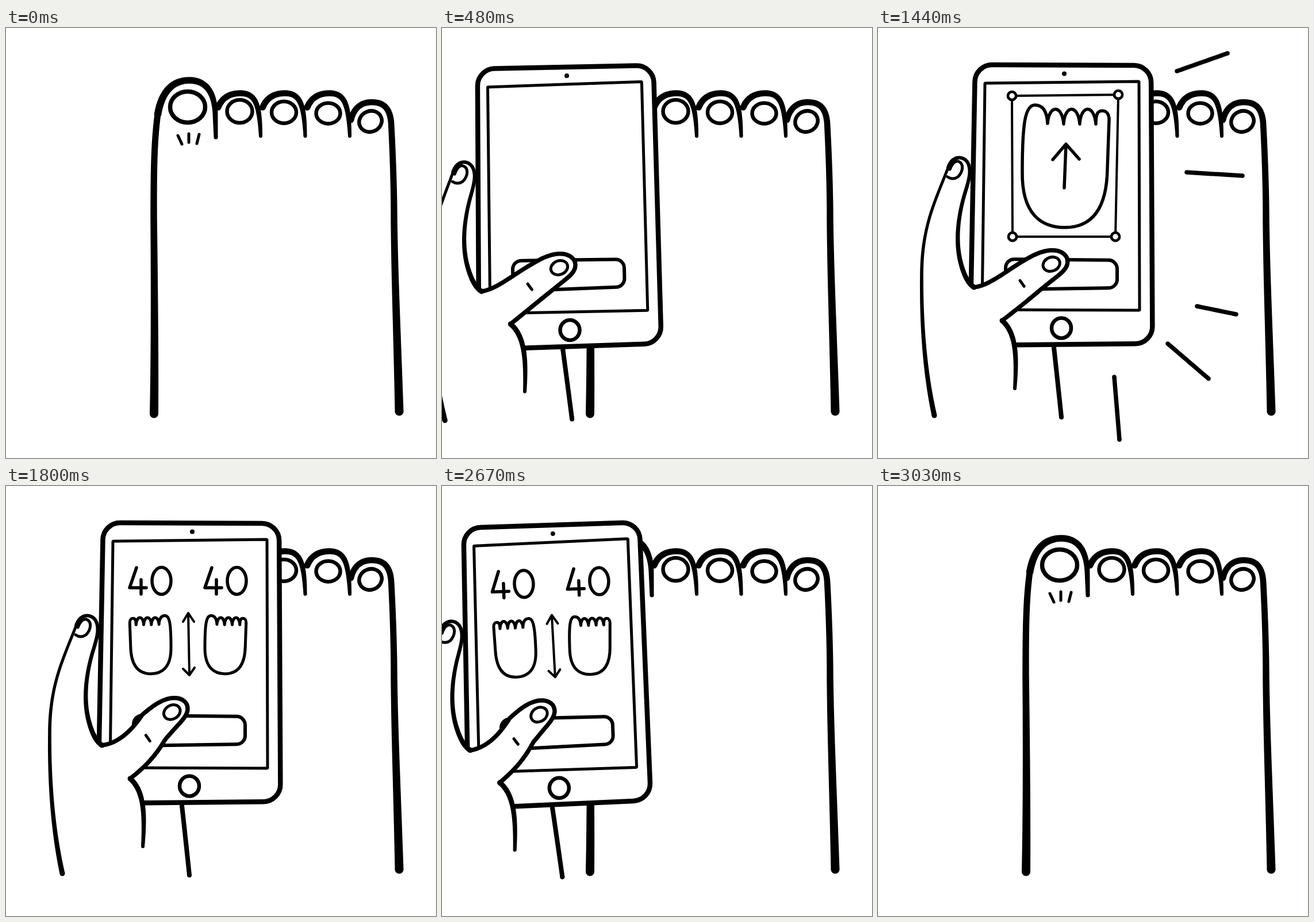
An HTML page with a canvas that plays this animation: 748 px wide and 748 px high, repeating every 3.12 s.

```html
<!DOCTYPE html>
<html lang="en">
<head>
<meta charset="utf-8">
<title>Foot scan</title>
<style>
  html, body { margin: 0; width: 100%; height: 100%; overflow: hidden; background: #fff; }
  canvas { display: block; width: 748px; height: 748px; }
</style>
</head>
<body>
<canvas id="stage" width="748" height="748" role="img" aria-label="A phone scans a foot and shows the sizes 40 and 40"></canvas>
<script>
const ctx = document.getElementById('stage').getContext('2d');
const LOOP = 3120, STEP = 30, SCAN_AT = 780, RESULT_AT = 1530;

// Samples a path as [x, y, width]; the width grows or shrinks towards the end.
function trace(d, from, to = from) {
  const path = document.createElementNS('http://www.w3.org/2000/svg', 'path');
  path.setAttribute('d', d);
  const length = path.getTotalLength(), n = Math.ceil(length / 4);
  return Array.from({ length: n + 1 }, (_, i) => {
    const u = i / n, { x, y } = path.getPointAtLength(length * u);
    return [x, y, from + (to - from) * u * u];
  });
}

function fill(pts, color) {
  ctx.fillStyle = color;
  ctx.beginPath();
  pts.forEach(p => ctx.lineTo(p[0], p[1]));
  ctx.fill();
}

function dot(x, y, w) {
  ctx.fillStyle = '#000';
  ctx.beginPath();
  ctx.arc(x, y, w / 2, 0, 7);
  ctx.fill();
}

// Tapered stroke with round ends.
function ink(pts) {
  const left = [], right = [], last = pts.length - 1;
  pts.forEach(([x, y, w], i) => {
    const a = pts[Math.max(i - 1, 0)], b = pts[Math.min(i + 1, last)];
    const dx = b[0] - a[0], dy = b[1] - a[1], k = w / 2 / (Math.hypot(dx, dy) || 1);
    left.push([x - dy * k, y + dx * k]);
    right.unshift([x + dy * k, y - dx * k]);
  });
  fill(left.concat(right), '#000');
  dot(...pts[0]);
  dot(...pts[last]);
}

function stroke(path, w) {
  ctx.lineWidth = w;
  ctx.stroke(typeof path === 'string' ? new Path2D(path) : path);
}

function ring(x, y, rx, ry, w, turn = 0) {
  ctx.lineWidth = w;
  ctx.beginPath();
  ctx.ellipse(x, y, rx, ry, turn, 0, Math.PI * 2);
  ctx.stroke();
}

// Four corners joined with rounded turns.
function roundPoly(corners, r) {
  const path = new Path2D(), [a, b] = corners;
  path.moveTo((a[0] + b[0]) / 2, (a[1] + b[1]) / 2);
  [1, 2, 3, 0].forEach(i => path.arcTo(...corners[i], ...corners[(i + 1) % 4], r));
  path.closePath();
  return path;
}

const FOOT = [
  trace('M264,150 C257,200 257,260 257,330 C258,430 259,560 257.5,671', 11, 15),
  trace('M264,150 C271,110 290,91 319,91 C350,91 363,115 364,150 L365,190', 12.5, 7),
  trace('M600,160 C605,140 617,129 636,129 C660,129 668,143 670,165 C674,240 675,300 675,330 C676,430 680,520 684,667', 10.5, 15)
];
for (let x = 369; x < 600; x += 77.5) {
  FOOT.push(trace(`M${x},138 q10,-24.5 39,-24.5 c27,0 33,21 35,74.5`, 11, 6));
}

const OUTER = trace('M122,243 C100,300 76,345 76,430 C75,540 86,620 98,674', 5, 9);
const INNER = trace('M122,243 C128,222 148,221 156,234 C163,248 159,262 151,288 C137,335 136,375 143,405 Q152,442 167,451', 6, 9);
const THUMB = trace('M167,451 C195,448 225,420 272,397 C300,384 322,387 330,402 C336,420 318,430 300,444 L216,509', 7.5);
const PALM = trace('M216,509 C240,530 242,570 238,627', 9, 6);
const WRIST = trace('M306,556 Q312,610 319,677', 8);
const RAYS = ['M520,75 L608,44', 'M537,251 L634,257', 'M555,484 L623,498', 'M504,549 L575,610', 'M411,607 L420,716']
  .map(d => trace(d, 7.5));

const BODY = roundPoly([[169, 64], [475, 65], [477.5, 549], [160, 552]], 30);
const SCREEN = roundPoly([[186, 96], [454, 93], [455, 491], [181, 490]], 1);
const BUTTON = roundPoly([[222, 399], [416, 401], [416, 449], [222, 452]], 15);
const CORNERS = [[233, 118], [418, 116], [413, 363], [234, 363]];

let printPath = 'M44,32 C43,12 36,0 22,0 C5,0 0,31 0,116 C-1,191 34,213 74,213 C124,213 147,176 148,111 L151,26 C151,14 145,10 139,10 C130,10 128,18 128,33';
for (let x = 44; x < 128; x += 28) printPath += `M${x},31 c3,-32 25,-32 28,2`;
const PRINT = new Path2D(printPath);

// Motion: [time, value], eased between entries.
const ENTER = [[0, 1], [680, 0]];
const LEAVE = [[2495, 0], [3030, 1]];
const LIFT = [[960, 0], [1200, -10.6], [1410, -1], [1470, -1.2], [1800, -10.6]];
const PRESS = [[1350, 0], [1410, 3], [1470, 3], [1560, 0]];
const RAY_HEAD = [[1320, 0], [1410, 1]];
const RAY_TAIL = [[1500, 0], [1590, 1]];

function tween(keys, t) {
  if (t <= keys[0][0]) return keys[0][1];
  const i = keys.findIndex(k => t < k[0]);
  if (i < 0) return keys[keys.length - 1][1];
  const [t0, a] = keys[i - 1], [t1, b] = keys[i];
  return a + (b - a) * (1 - Math.cos(Math.PI * (t - t0) / (t1 - t0))) / 2;
}

function drawFoot() {
  FOOT.forEach(ink);
  ring(316, 137.5, 30.5, 27, 7.5);
  for (let i = 0; i < 3; i++) ring(406.5 + 77 * i, 145 + 1.7 * i, 22 - i / 2, 20 - i, 6.5);
  ring(634, 162.5, 20, 18, 6.5, -.4);
  stroke('M299,187 l7,15 M318,184 v15 M336,185 l-4,16', 5);
}

function drawRays(t) {
  const head = tween(RAY_HEAD, t), tail = tween(RAY_TAIL, t);
  for (const ray of RAYS) {
    const part = ray.slice(Math.round(ray.length * tail), Math.round(ray.length * head));
    if (part.length > 1) ink(part);
  }
}

function drawPrint(x, y, sx, sy, w) {
  ctx.save();
  ctx.translate(x, y);
  ctx.scale(sx, sy);
  stroke(PRINT, w / sy);
  ctx.restore();
}

function drawScan() {
  stroke(roundPoly(CORNERS, 0), 4);
  ctx.fillStyle = '#fff';
  for (const [x, y] of CORNERS) {
    ring(x, y, 7, 7, 4.5);
    ctx.fill();
  }
  CORNERS.forEach(([x, y]) => ring(x, y, 7, 7, 4.5));
  drawPrint(251, 134, 1, 1, 5.5);
  stroke('M324,278 L327,203 M304,229 L327,202 L350,228', 5.5);
}

function drawSize(x) {
  stroke(`M${x + 14},142 l-12,35 h29 m-9,-14 v25`, 5.5);
  ring(x + 57.5, 165, 16.5, 23.5, 5.5);
}

function drawResult() {
  drawSize(213);
  drawSize(344);
  drawPrint(346, 225.5, .475, .475, 5);
  drawPrint(287, 225.5, -.475, .475, 5);
  stroke('M317,222 L319,328 M308,236 L317,221 L327,236 M308,318 L319,329 L328,316', 4);
}

function drawPhone(t) {
  ctx.fillStyle = '#fff';
  ctx.fill(BODY);
  stroke(BODY, 8.5);
  stroke(SCREEN, 5);
  dot(324, 79.5, 8);
  ring(319, 522, 17, 17.5, 6.5);
  if (t >= RESULT_AT) drawResult();
  else if (t >= SCAN_AT) drawScan();
  ctx.save();
  ctx.translate(0, tween(PRESS, t));
  stroke(BUTTON, 6);
  ctx.restore();
}

// Bends the thumb around its base; the base itself stays put.
function bend([x, y, w], angle) {
  const dx = x - 190, dy = y - 480;
  const a = angle * Math.min(Math.max((Math.hypot(dx, dy) - 35) / 60, 0), 1);
  const c = Math.cos(a), s = Math.sin(a);
  return [190 + dx * c - dy * s, 480 + dx * s + dy * c, w];
}

function drawHand(t) {
  const angle = tween(LIFT, t) * Math.PI / 180;
  const thumb = THUMB.map(p => bend(p, angle));
  fill([...OUTER].reverse().concat(INNER, thumb, PALM), '#fff');
  [OUTER, INNER, thumb, PALM, WRIST].forEach(ink);
  stroke('M121,259 Q130,265 139,259 C148,250 150,236 140,232 C132,230 128,238 125,246', 5);
  const [x, y] = bend([303, 413], angle);
  ring(x, y, 15, 12, 5, angle - .35);
  const [cx, cy] = bend([251, 445], angle);
  stroke(`M${cx - 3.5},${cy - 5} l7,10`, 5);
}

function draw(t) {
  ctx.fillStyle = '#fff';
  ctx.fillRect(0, 0, 748, 748);
  ctx.strokeStyle = '#000';
  ctx.lineCap = ctx.lineJoin = 'round';
  drawFoot();
  drawRays(t);

  const come = tween(ENTER, t), go = tween(LEAVE, t);
  const turn = 6.8 * come + 6 * go ** .75;
  ctx.save();
  ctx.translate(320 - 512 * come - 510 * go, 300 + 8 * Math.sqrt(come) + 14 * go);
  ctx.rotate(-turn * Math.PI / 180);
  ctx.translate(-320, -300);
  fill([[98, 676], [90, 560], [200, 500], ...WRIST, [319, 682]], '#fff');
  drawPhone(t);
  drawHand(t);
  ctx.restore();
}

const start = performance.now();
function tick() {
  const t = (performance.now() - start) % LOOP;
  draw(Math.floor(t / STEP) * STEP);
  requestAnimationFrame(tick);
}
tick();
</script>
</body>
</html>
```
